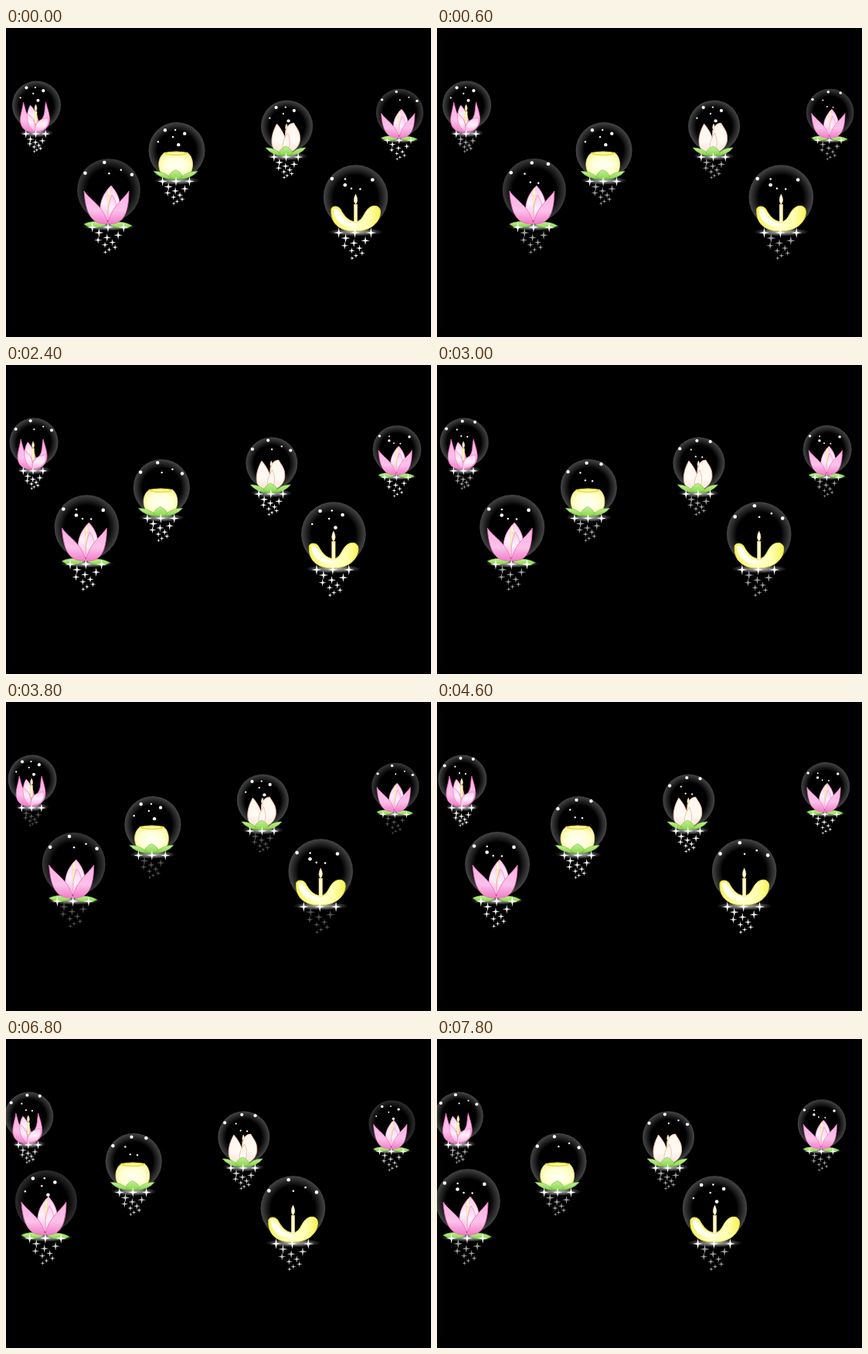
Recreate the animation shown at these times as an HTML page. Size 550x400 px, loop 8 s.

```html
<!DOCTYPE html>
<html lang="en">
<head>
<meta charset="utf-8">
<title>Floating lotus lanterns</title>
<style>
html, body { margin: 0; width: 100%; height: 100%; overflow: hidden; background: #000; }
svg { display: block; width: 100vw; height: 100vh; }
</style>
</head>
<body>
<svg id="stage" viewBox="0 0 550 400">
  <defs>
    <radialGradient id="glass">
      <stop offset=".68" stop-color="#fff" stop-opacity="0"/>
      <stop offset=".82" stop-color="#fff" stop-opacity=".12"/>
      <stop offset=".96" stop-color="#fff" stop-opacity=".24"/>
      <stop offset="1" stop-color="#fff" stop-opacity=".28"/>
    </radialGradient>
    <radialGradient id="shine">
      <stop offset="0" stop-color="#fff" stop-opacity=".75"/>
      <stop offset=".5" stop-color="#fff" stop-opacity=".4"/>
      <stop offset="1" stop-color="#fff" stop-opacity="0"/>
    </radialGradient>
    <linearGradient id="pink" x2="0" y2="1">
      <stop offset="0" stop-color="#f9b0e2"/>
      <stop offset=".6" stop-color="#fbc2ea"/>
      <stop offset="1" stop-color="#f47cca"/>
    </linearGradient>
    <linearGradient id="blush" x2="0" y2="1">
      <stop offset="0" stop-color="#fcc8ec"/>
      <stop offset=".5" stop-color="#fff2fb"/>
      <stop offset="1" stop-color="#fab0e0"/>
    </linearGradient>
    <linearGradient id="cream" x2="0" y2="1">
      <stop offset="0" stop-color="#fff6ee"/>
      <stop offset=".6" stop-color="#fffaf4"/>
      <stop offset="1" stop-color="#fde0d2"/>
    </linearGradient>
    <radialGradient id="lemon" cx=".5" cy=".5" r=".6">
      <stop offset="0" stop-color="#fffff6"/>
      <stop offset=".6" stop-color="#ffffd4"/>
      <stop offset="1" stop-color="#f8f290"/>
    </radialGradient>
    <linearGradient id="gold">
      <stop offset="0" stop-color="#f8f466"/>
      <stop offset=".45" stop-color="#ffffc8"/>
      <stop offset=".75" stop-color="#ffffb4"/>
      <stop offset="1" stop-color="#f8f258"/>
    </linearGradient>
    <linearGradient id="leaf" x2="0" y2="1">
      <stop offset="0" stop-color="#c4f098"/>
      <stop offset="1" stop-color="#86d648"/>
    </linearGradient>
  </defs>
</svg>
<script>
const LOOP = 8000, STEP = 200;
const STATE_RATE = 40 / 27; // bubble states per step
const TWINKLE = 12;         // steps per sparkle pulse

const shape = (fill, line, w = .8) => d =>
  `<path d="${d}" fill="${fill}" stroke="${line}" stroke-width="${w}" stroke-linejoin="round"/>`;
const pink = shape('url(#pink)', '#ee66bc');
const blush = shape('url(#blush)', '#f088ca');
const cream = shape('url(#cream)', '#f0b498');
const leaf = shape('url(#leaf)', '#6cba34', .6);
const gold = shape('url(#gold)', '#e4dc3c', 1);
const pale = shape('#fffff0', 'none');
const flame = shape('#fffde0', '#f6d88c', .6);
const disc = (x, y, r, more = '') => `<circle cx="${x}" cy="${y}" r="${r}" ${more}/>`;

function candle(x, top, base, w) {
  const h = w * 3, mid = top + h * .65;
  return `<rect x="${x - w / 2}" y="${top + h}" width="${w}" height="${base - top - h}" fill="#fff8c0" stroke="#ecd484" stroke-width=".5"/>` +
    flame(`M${x},${top} Q${x + w},${mid} ${x},${top + h} Q${x - w},${mid} ${x},${top}Z`);
}

const sepals = (x, y, w) =>
  [-1, 1].map(s => leaf(`M${x + s * w},${y - 4} Q${x + s * w * .55},${y - 5} ${x + s * 4},${y + 6} Q${x + s * w * .7},${y + 6} ${x + s * w},${y - 4}Z`)).join('') +
  leaf(`M${x},${y - 6} Q${x + 8},${y - 2} ${x + 9},${y + 3} Q${x},${y + 10} ${x - 9},${y + 3} Q${x - 8},${y - 2} ${x},${y - 6}Z`);

// Flowers are drawn around the centre of their bubble.
const art = {
  lotus: () =>
    leaf('M-32,44 Q-23,38 -2,42 Q-7,50 -25,48Z') +
    leaf('M30,46 Q19,39 0,42 Q5,50 23,49Z') +
    blush('M3,-6 C-7,4 -15,18 -9,38 L9,40 C18,26 16,8 3,-6Z') +
    candle(0, -3, 34, 3.4) +
    blush('M4,6 C12,16 13,32 0,43 C-2,30 -1,16 4,6Z') +
    pink('M-32,1 C-23,14 -7,20 -1,43 C-22,46 -30,30 -32,1Z') +
    pink('M26,1 C18,13 4,20 -1,43 C17,46 26,32 26,1Z'),

  tulip: () =>
    blush('M-8,0 C-13,8 -13,20 -7,26 L3,26 C2,14 -2,6 -8,0Z') +
    pink('M-17,-4 C-14,6 -13,16 -5,20 L5,20 C12,14 10,4 12,-4 C14,4 19,16 16,24 C13,32 7,35 -2,35 C-11,35 -18,32 -20,25 C-23,16 -18,6 -17,-4Z') +
    candle(-1, -1, 23, 3) +
    blush('M-12,10 C-4,16 -1,24 -2,34 C-10,30 -13,20 -12,10Z') +
    blush('M15,16 C4,17 -3,24 -2,34 C10,34 17,27 15,16Z'),

  bud: () =>
    candle(-.5, -3, 24, 2.8) +
    cream('M9,-4 C0,-4 -2,6 -2,14 L-2,35 C9,35 18,25 17,15 C17,7 13,3 9,-4Z') +
    cream('M-13,-3 C-18,6 -21,16 -19,25 C-17,33 -9,35 -2,35 C3,23 -4,7 -13,-3Z') +
    cream('M1,9 C-7,20 -7,29 -2,35 C5,28 5,18 1,9Z') +
    sepals(-1.5, 32, 26),

  bowl: () =>
    shape('url(#lemon)', '#ece478')('M-16,3 C-26,10 -25,26 -17,33 Q-1,40 15,33 C22,26 23,10 14,3Z') +
    shape('#fbf59c', '#e6d624', 1.1)('M-16,3 Q-1,0 14,3 Q11,6 -1,6 Q-13,6 -16,3Z') +
    sepals(-1.5, 31, 28.5),

  boat: () =>
    gold('M-31.5,15 C-30,11 -23,11 -20,15 C-15,24 -10,31 0,32 C9,31 10,21 16,15 C22,9 32,10 32,19 C32,31 21,44 -1,44 C-22,44 -33,33 -31.5,15Z') +
    candle(0, -4, 33, 4.4) +
    pale('M-29,16 C-23,13 -21,19 -17,25 C-12,32 -6,35 4,34 C-4,42 -27,38 -29,16Z')
};

// r: bubble radius, v: pixels to the left per step, water: line below the centre, w: half width of the glow.
const lanterns = [
  { art: 'tulip', x: 39.5, y: 100, r: 31.5, v: .285, phase: 3.1, water: 36, w: 22 },
  { art: 'lotus', x: 509.5, y: 109.5, r: 41, v: .295, phase: .74, water: 47, w: 35, scale: .75, swell: 2 },
  { art: 'bud', x: 363.5, y: 127, r: 33.5, v: 1.64, phase: 3.1, water: 39, w: 27 },
  { art: 'bowl', x: 221, y: 158.5, r: 36.5, v: 1.64, phase: 3.1, water: 39, w: 30 },
  { art: 'lotus', x: 133, y: 210, r: 41, v: 2.385, phase: .74, water: 47, w: 35, swell: 2 },
  { art: 'boat', x: 452.5, y: 219, r: 41.8, v: 2.385, phase: 2.1, water: 45, w: 36 }
];

// Light dots per bubble state as [degrees, distance]; the first three are large.
const dotStates = [
  [[-99, .89], [-144, .92], [-34, .88], [-89, .53], [-59, .75]],
  [[-143, .92], [-95, .87], [-62, .94], [-120, .6], [-116, .28], [-60, .26]],
  [[-142, .93], [-46, .75], [-131, .5], [-120, .65], [-116, .3], [-61, .29]],
  [[-120, .83], [-65, .66], [-73, .21], [-94, .73], [-106, .5], [-155, .73]]
];

function dot([deg, dist], i, r) {
  const a = deg * Math.PI / 180;
  return disc(r * dist * Math.cos(a), r * dist * Math.sin(a), (i < 3 ? 2.3 : 1.25) * (.5 + r / 82));
}

function star(x, y, s) {
  const k = s * .16;
  return `<path d="M${x},${y - s} L${x + k},${y - k} ${x + s},${y} ${x + k},${y + k} ${x},${y + s} ${x - k},${y + k} ${x - s},${y} ${x - k},${y - k}Z"/>` +
    disc(x, y, s * .27);
}

// Three sparkles on the water line.
const shore = ({ water, w }) =>
  [-1, 0, 1].map(i => star(i * w * .58 - 1, water + 1, 4 + w * .08)).join('');

// Sparkles below it, spread by the golden ratio and tapering downwards.
function falling({ water, w }) {
  const n = 9;
  return Array.from({ length: n }, (_, j) => {
    const t = j / (n - 1), side = (j * .618 + .2) % 1 * 2 - 1;
    return star(side * w * .6 * (1 - .7 * t), water + 8 + t * w * .72, (3.4 + w * .08) * (1 - .5 * t));
  }).join('');
}

function build(l) {
  const g = document.createElementNS('http://www.w3.org/2000/svg', 'g');
  g.setAttribute('fill', '#fff');
  g.innerHTML =
    disc(0, 0, l.r, 'class="glass" fill="url(#glass)"') +
    `<ellipse cy="${l.water}" rx="${l.w}" ry="5.5" fill="url(#shine)"/>` +
    art[l.art]() +
    dotStates.map(set => `<g class="dots">${set.map((d, i) => dot(d, i, l.r)).join('')}</g>`).join('') +
    shore(l) + `<g class="fall">${falling(l)}</g>`;
  document.getElementById('stage').append(g);
  l.node = g;
  l.glass = g.querySelector('.glass');
  l.dots = g.querySelectorAll('.dots');
  l.fall = g.querySelector('.fall');
}

function draw(step) {
  const twinkle = .62 + .35 * Math.cos(2 * Math.PI * step / TWINKLE);
  for (const l of lanterns) {
    const { x, y, v, scale = 1, swell = 0 } = l;
    const phase = l.phase + step * STATE_RATE;
    const grow = (phase + 1) / 4 % 1;
    l.node.setAttribute('transform', `translate(${x - v * step} ${y}) scale(${scale})`);
    l.glass.setAttribute('r', l.r + swell * (grow - .5));
    l.glass.setAttribute('opacity', 1 - swell * .17 * (1 - grow));
    l.dots.forEach((d, i) => d.setAttribute('visibility', i === Math.floor(phase) % 4 ? 'visible' : 'hidden'));
    l.fall.setAttribute('opacity', twinkle);
  }
}

function tick() {
  draw(Math.floor(performance.now() % LOOP / STEP));
  requestAnimationFrame(tick);
}

lanterns.forEach(build);
tick();
</script>
</body>
</html>
```
